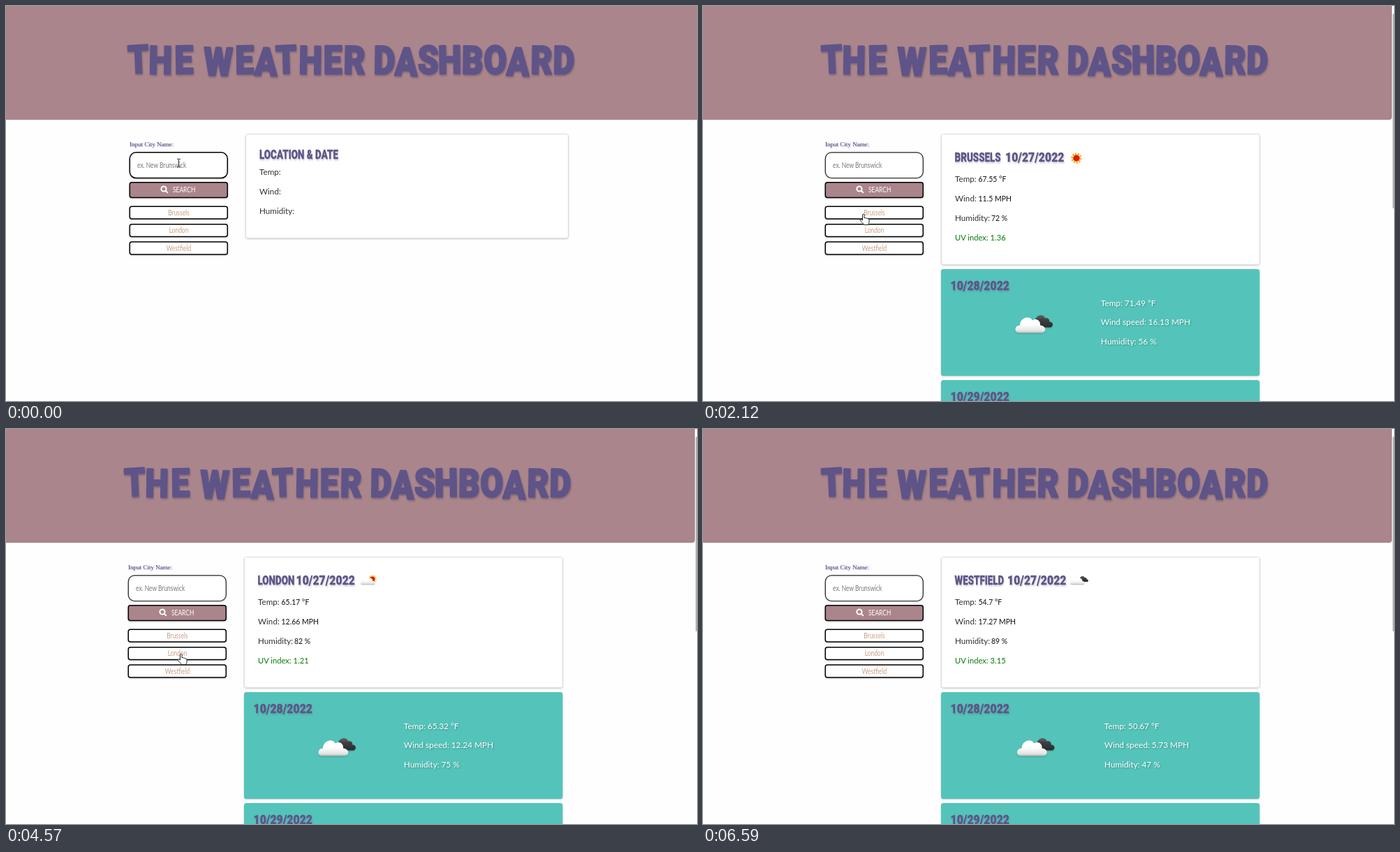
These frames come from a looping animation (990 by 566 pixels, 7270 ms). An HTML page:

```html
<!DOCTYPE html>
<html lang="en">
<head>
<meta charset="utf-8">
<title>The Weather Dashboard</title>
<style>
html, body { margin: 0; width: 100%; height: 100%; overflow: hidden; background: #fefefe; }
svg { display: block; width: 100vw; height: 100vh; }
text { font-family: Lato, sans-serif; white-space: pre; }
.title, .head { font-family: Roboto, sans-serif; font-weight: 900; fill: #5f5488; stroke: #5f5488; stroke-linejoin: round; }
.title { font-size: 56px; stroke-width: 2.4; text-anchor: middle; filter: drop-shadow(1px 2px 1.2px rgba(70, 60, 80, .4)); }
.head { font-size: 18px; stroke-width: .3; filter: drop-shadow(1px 2px 1px rgba(90, 80, 110, .28)); }
.label { font: 9px "Liberation Serif", serif; fill: #4b4278; filter: drop-shadow(1px 1px .6px rgba(95, 84, 160, .35)); }
.hand { font-size: 12.2px; }
.mid { text-anchor: middle; }
.body { font-size: 11.7px; fill: #2e3136; }
.value { font-size: 10.5px; fill: #111; }
.uv { font-size: 11.2px; fill: #087a08; }
.light { font-size: 11.8px; fill: #fff; filter: drop-shadow(1px 1px 1px rgba(0, 0, 0, .3)); }
.lift { filter: drop-shadow(0 1.5px 1px rgba(0, 0, 0, .2)); }
</style>
</head>
<body>
<svg id="stage" viewBox="0 0 990 566" preserveAspectRatio="none" xmlns="http://www.w3.org/2000/svg">
  <defs>
    <linearGradient id="pale" x2="0" y2="1">
      <stop offset=".45" stop-color="#fff"/><stop offset=".85" stop-color="#e4e4e4"/><stop offset="1" stop-color="#b9b9b9"/>
    </linearGradient>
    <linearGradient id="dark" x2="0" y2="1">
      <stop stop-color="#666"/><stop offset=".4" stop-color="#3c3d3f"/><stop offset="1" stop-color="#2b2c2e"/>
    </linearGradient>
    <path id="cloud" d="M6 27C-2 27-1 16 7 16C7 5 21 1 25 9C31 5 37 10 36 16C46 17 45 27 38 27Z" fill="url(#pale)"/>
    <g id="clouds">
      <path d="M26 19C20 17 24 9 29 9C30 0 42-1 43 6C48 4 50 9 49 11C56 11 55 19 50 19Z" fill="url(#dark)"/>
      <use href="#cloud"/>
    </g>
    <g id="sun">
      <circle r="6" fill="none" stroke="#f7a51d" stroke-width="3.4" pathLength="20" stroke-dasharray="1.1 .9"/>
      <circle r="5" fill="#f08a12"/><circle r="4.3" fill="#e31700"/>
    </g>
  </defs>
  <rect width="990" height="566" fill="#fefefe"/>
  <g id="banner"></g>
  <g id="panel"></g>
  <g id="main"></g>
  <g id="forecast"></g>
  <g id="cursor" stroke-linejoin="round">
    <path id="beam" d="M-2.5-6Q0-6 0-4.5Q0-6 2.5-6M0-5V5M-2.5 6Q0 6 0 4.5Q0 6 2.5 6" fill="none" stroke="#222"/>
    <path id="arrow" d="M0 0V13L3 10.2L5 15L7 14.2L5 9.5H9Z" fill="#fff" stroke="#222" stroke-width=".9"/>
    <path id="point" d="M-1.5 8V1.3C-1.5-.3 1-.3 1 1.3V6C2 5 3.3 5.3 3.5 6.3C4.5 5.6 5.8 6 6 7C7 6.6 8 7.2 8 8.3V11C8 13 7 14 7 15.5H.5C0 14-3 11.5-4.6 9.5C-5.3 8-3.5 7-1.5 9Z" fill="#fff" stroke="#222"/>
  </g>
</svg>
<script>
const LOOP = 7270, LOADED = 2090, BLUR = 1820;
const ROSE = '#aa858b', TEAL = '#54c4ba';
const $ = id => document.getElementById(id);

const cities = [
  { name: 'BRUSSELS', dateX: 433, now: ['67.55 °F', '11.5 MPH', '72 %', '1.36'],
    next: ['71.49 °F', '16.13 MPH', '56 %'], nextX: 570, main: LOADED, forecast: LOADED,
    icon: '<use href="#sun" x="535" y="218"/>' },
  { name: 'LONDON', dateX: 415.5, now: ['65.17 °F', '12.66 MPH', '82 %', '1.21'],
    next: ['65.32 °F', '12.24 MPH', '75 %'], nextX: 570, main: 3800, forecast: 4140,
    icon: '<use href="#sun" transform="translate(525 215) scale(.75)"/>' +
          '<use href="#cloud" class="lift" transform="translate(508 210) scale(.48)"/>' },
  { name: 'WESTFIELD', dateX: 436, now: ['54.7 °F', '17.27 MPH', '89 %', '3.15'],
    next: ['50.67 °F', '5.73 MPH', '47 %'], nextX: 575, main: 5380, forecast: 5660,
    icon: '<use href="#clouds" class="lift" transform="translate(526 210) scale(.48)"/>' }
];

// time, x, y of the pointer tip
const path = [
  [0, 247.5, 225], [800, 247.5, 225], [910, 236, 283], [990, 229, 301], [1140, 229, 301],
  [1290, 230, 298], [2270, 230, 298], [2480, 268, 338], [2720, 316, 372], [2970, 274, 363],
  [3060, 258, 344], [3280, 251, 322], [4570, 251, 322], [4800, 256, 337], [4990, 266, 346],
  [6190, 266, 346], [6330, 420, 400], [6460, 620, 460], [6590, 795, 552]
];
const GONE = 6590;

const text = (x, y, cls, str) => `<text x="${x}" y="${y}" class="${cls}">${str}</text>`;
// condensed lettering: one fixed ratio per face
const narrow = (x, y, cls, str, ratio, fill = '') =>
  `<text class="${cls}" transform="translate(${x} ${y}) scale(${ratio} 1)"${fill && ` fill="${fill}"`}>${str}</text>`;
const head = (x, y, str) => narrow(x, y, 'head', str, .745);
const date = (x, y, str) => narrow(x, y, 'head', str, .88);
const hand = (x, y, str, fill, cls = '') => narrow(x, y, 'hand ' + cls, str, .69, fill);
const box = (x, y, w, h, r, fill, extra = '') =>
  `<rect x="${x}" y="${y}" width="${w}" height="${h}" rx="${r}" fill="${fill}" ${extra}/>`;
const card = (x, y, w, h) =>
  box(x, y, w, h, 3, '#fff', 'class="lift" stroke="#dedede" stroke-width="1"');

function banner(loaded) {
  const words = 'THE WEATHER DASHBOARD', ratio = .85, dx = loaded ? -5 : 0;
  const centers = [190.5, 221, 255, 273, 304, 342, 372, 402, 436, 468, 499, 520,
    542, 573, 605, 636, 668, 701, 733, 767, 799];
  const tilt = [-3, 1, -1, 0, 1, -1, 2, -2, 1, 0, 1, 0, 1, 2, 0, -1, 1, 0, 2, 1, 1];
  const xs = centers.map(c => ((c + dx) / ratio).toFixed(2)).join(' ');
  const ys = [...words].map(c => 'WA'.includes(c) ? 99 : 97).join(' ');
  const shape = loaded
    ? box(-9, -9, 996, 172, 4, ROSE) + box(988, 11, 2, 279, 1, '#b3b3b3')
    : box(0, 0, 990, 163, 0, ROSE);
  return shape + `<text class="title" transform="scale(${ratio} 1)" x="${xs}" y="${ys}" rotate="${tilt.join(' ')}">${words}</text>`;
}

function panel(loaded, focus, caret, hover) {
  const edge = 'stroke="#000" stroke-width="1.5" class="lift"';
  const rows = ['Brussels', 'London', 'Westfield'].map((name, i) => {
    const y = 287.3 + i * 25.4;
    return box(177.3, y, 140, 17.8, 3, hover && !i ? '#f6f7f8' : '#fff', edge) +
      hand(247.5, y + 12.6, name, '#c99f84', 'mid');
  }).join('');
  const field = focus ? edge : 'stroke="#222" stroke-width="1.2" class="lift"';
  return `<g transform="translate(${loaded ? -2 : 0} 0)">` +
    text(177, 201, 'label', 'Input City Name:') +
    box(177.3, 209.8, 140, 36.7, 9, '#fff', field) +
    hand(188, 231.7, 'ex. New Brunswick', '#74777d') +
    (caret ? box(188, 220, 1, 16, 0, '#000') : '') +
    box(177.3, 252.7, 140, 21.7, 3, ROSE, edge) +
    '<g fill="none" stroke="#fff" stroke-width="2"><circle cx="226" cy="262" r="3.6"/><path d="M228.6 264.6L231.8 267.8"/></g>' +
    hand(239, 267.3, 'SEARCH', '#fff') + rows + '</g>';
}

function mainCard(city) {
  const names = ['Temp:', 'Wind:', 'Humidity:'];
  if (!city) return card(343.5, 183.5, 462, 149) + head(363, 219, 'LOCATION &amp; DATE') +
    names.map((n, i) => text(363, 242 + 28 * i, 'body', n)).join('');
  return card(341.5, 183.5, 456, 187) + head(360.5, 223, city.name) +
    date(city.dateX, 223, '10/27/2022') + city.icon +
    names.map((n, i) => text(361, 252 + 28 * i, 'body', n) +
      text([394.5, 394.5, 413][i], 252 + 28 * i, 'value', city.now[i])).join('') +
    text(361, 336, 'uv', 'UV index: ' + city.now[3]);
}

function forecast(city) {
  if (!city) return '';
  const names = ['Temp: ', 'Wind speed: ', 'Humidity: '];
  return [0, 1].map(i => box(341, 377 + 159 * i, 456.5, 153, 3.5, TEAL, 'class="lift"') +
      date(354.5, 407 + 159 * i, `10/${28 + i}/2022`)).join('') +
    `<use href="#clouds" class="lift" transform="translate(${city.nextX === 570 ? 447 : 449.5} 441.5)"/>` +
    names.map((n, i) => text(city.nextX, 430 + 27.3 * i, 'light', n + city.next[i])).join('');
}

function pointer(t) {
  const i = path.findIndex(p => p[0] > t);
  if (i < 1) return path[path.length - 1].slice(1);
  const [t0, x0, y0] = path[i - 1], [t1, x1, y1] = path[i];
  const k = (t - t0) / (t1 - t0);
  return [x0 + (x1 - x0) * k, y0 + (y1 - y0) * k];
}

function pointerKind(x, y) {
  if (x < 175 || x > 317) return 'arrow';
  if (y > 209 && y < 247) return 'beam';
  const onButton = [[252, 275], [287, 305.5], [312, 331], [337, 356.5]].some(([a, b]) => y >= a && y <= b);
  return onButton ? 'point' : 'arrow';
}

const drawn = {};
function put(id, html) {
  if (drawn[id] === html) return;
  drawn[id] = html;
  $(id).innerHTML = html;
}

function draw(t) {
  const loaded = t >= LOADED, focus = t < BLUR;
  const caret = focus && ((t >= 270 && t < 800) || t >= 1290);
  const latest = key => cities.filter(c => t >= c[key]).pop();
  put('banner', banner(loaded));
  put('panel', panel(loaded, focus, caret, t >= 890 && t < 990));
  put('main', mainCard(latest('main')));
  put('forecast', forecast(latest('forecast')));
  const [x, y] = pointer(t), kind = pointerKind(x, y);
  $('cursor').setAttribute('transform', `translate(${x.toFixed(1)} ${y.toFixed(1)})`);
  $('cursor').setAttribute('visibility', t < GONE ? 'visible' : 'hidden');
  for (const k of ['beam', 'arrow', 'point']) $(k).setAttribute('display', k === kind ? 'inline' : 'none');
}

const start = performance.now();
function tick() {
  draw((performance.now() - start) % LOOP);
  requestAnimationFrame(tick);
}
tick();
</script>
</body>
</html>
```
